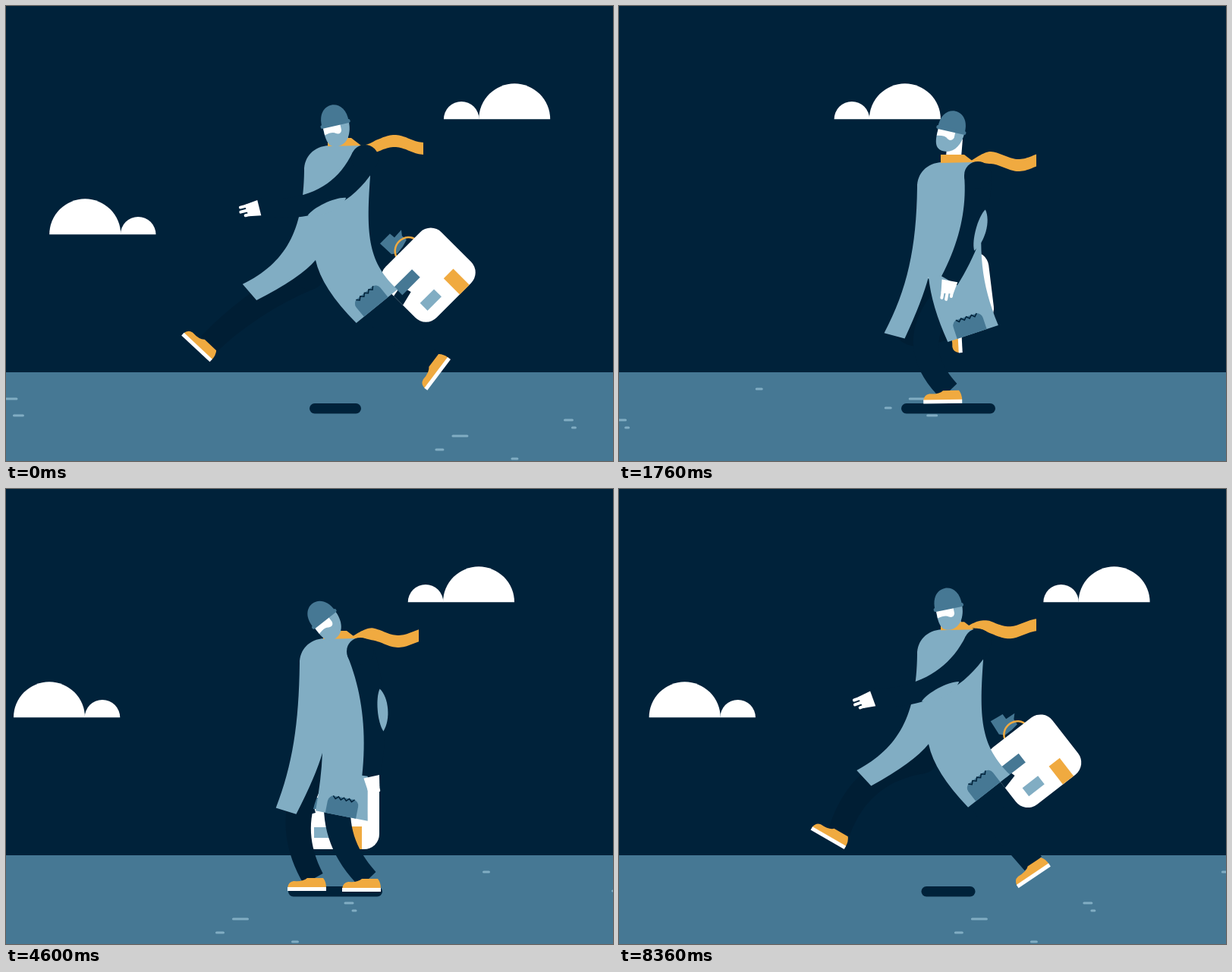
Animation of 800x600 px, one loop 8400 ms. Source, as an HTML page with a canvas:

```html
<!DOCTYPE html>
<html lang="en">
<head>
<meta charset="utf-8">
<title>Runner with a suitcase</title>
<style>
html, body { margin: 0; width: 100%; height: 100%; overflow: hidden; background: #00223a; }
canvas { display: block; }
</style>
</head>
<body>
<canvas id="stage" width="800" height="600"></canvas>
<script>
const ctx = document.getElementById('stage').getContext('2d');
const LOOP = 8400, STRIDE = 640, STOP = 3540, WRAP = 1134;
const DARK = '#00223a', SHADE = '#001e34', MID = '#467894', LIGHT = '#81adc3', ORANGE = '#f0aa40', WHITE = '#fff';
const { sin, cos, PI, hypot, atan2, min, max } = Math;

const mix = (a, b, u) => a + (b - a) * u;
const mixPose = (a, b, u) => Object.fromEntries(Object.keys(a).map(k => [k, mix(a[k], b[k], u)]));
const rad = deg => deg * PI / 180;
const wrap = x => ((x + 150) % WRAP + WRAP) % WRAP - 150;
const smooth = (a, b, t) => {
  const u = min(1, max(0, (t - a) / (b - a)));
  return u * u * (3 - 2 * u);
};
// Share of the way covered: quick start, long glide to a halt.
const travel = (t, start, a, b) => {
  const u = min(1, max(0, (t - start) / (STOP - start)));
  return 1 - (1 - u ** a) ** b;
};

// Angles in degrees: front and back are the swing of the coat flaps, upper and lower the arm.
const stance = {
  facing: 1, shadow: 124, reach: 0.6,
  farX: 410, farY: 514, farTilt: 0, nearX: 477, nearY: 515, nearTilt: 0
};
const alert = {
  ...stance, x: 428, y: 188, headX: -6, headY: -36, tilt: -10, hip: -16, front: 17, back: 30,
  upper: 76, lower: 113, hand: 105, bagX: 410, bagY: 415, bagTilt: 5
};
const tired = {
  ...stance, x: 434, y: 196, headX: -15, headY: -25, tilt: -38, hip: -17, front: 32, back: 17,
  upper: 70, lower: 98, hand: 78, bagX: 440, bagY: 428, bagTilt: 0, farX: 405
};
const proud = {
  ...stance, x: 441, y: 183, headX: -4, headY: -42, tilt: -28, hip: -12, front: 17, back: 25,
  upper: 50, lower: 157, hand: 176, bagX: 370, bagY: 407, bagTilt: 1.5, facing: -1
};

// Path of a running foot; phase 0 is the furthest point in front.
function foot(p) {
  const c = cos(p), s = sin(p);
  return {
    x: 415 - 148 * c + s * s * (20 + 65 * c),
    y: 462 + 42 * s - 4 * cos(2 * p) - 20 * sin(2 * p) - 12 * cos(3 * p),
    tilt: -26 + 48 * c + 42 * s + 21 * cos(2 * p) - 13 * sin(2 * p) - 4 * sin(3 * p)
  };
}

function runPose(t) {
  const p = t / STRIDE * 2 * PI, c = cos(p), s = sin(p), c2 = cos(2 * p);
  const drop = Math.abs(s) ** 3, far = foot(p), near = foot(p + PI);
  const lower = 127 + 52 * c + 7 * c2;
  return {
    x: 440, y: 183 + 22 * drop, headX: -6 + 4 * drop, headY: -28 - 14 * drop, tilt: -13 + 26 * drop,
    facing: 1, hip: -32, front: 64 - 34 * drop, back: 53 - 15 * drop, shadow: 68 + 56 * drop,
    upper: 68 + 70 * c - 20 * c2, lower, hand: lower - 20, reach: c,
    bagX: 443 + 110 * c + 4 * c2, bagY: 372 - 25 * c - 12 * s + 8 * c2, bagTilt: -21 - 24 * c - 14 * s,
    farX: far.x, farY: far.y, farTilt: far.tilt, nearX: near.x, nearY: near.y, nearTilt: near.tilt
  };
}

function poseAt(t, early) {
  const rest = mixPose(mixPose(alert, tired, smooth(3600, 4500, t)), proud, smooth(6000, 6850, t));
  const run = 1 - smooth(2400, 3300, t) + smooth(8040, 8340, t);
  return mixPose(rest, runPose(early), run);
}

function fill(color, draw) {
  ctx.fillStyle = color;
  ctx.beginPath();
  draw();
  ctx.fill();
}
const trace = p => {
  for (let i = 0; i < p.length; i += 2) ctx.lineTo(p[i], p[i + 1]);
};
const poly = (color, ...p) => fill(color, () => trace(p));
const pill = (color, x, y, w, h, r = h / 2) => fill(color, () => ctx.roundRect(x, y, w, h, r));
function line(color, width, ...p) {
  ctx.strokeStyle = color;
  ctx.lineWidth = width;
  ctx.beginPath();
  trace(p);
  ctx.stroke();
}
function at(x, y, angle, draw) {
  ctx.save();
  ctx.translate(x, y);
  ctx.rotate(angle);
  draw();
  ctx.restore();
}

// Tapered limb along a quadratic curve.
function limb(color, sx, sy, cx, cy, ex, ey, r0, r1) {
  const left = [], right = [];
  for (let n = 0; n <= 20; n++) {
    const u = n / 20, r = mix(r0, r1, u);
    const x = mix(mix(sx, cx, u), mix(cx, ex, u), u), y = mix(mix(sy, cy, u), mix(cy, ey, u), u);
    const dx = mix(cx - sx, ex - cx, u), dy = mix(cy - sy, ey - cy, u), len = hypot(dx, dy) || 1;
    left.push(x - dy / len * r, y + dx / len * r);
    right.unshift(x + dy / len * r, y - dx / len * r);
  }
  poly(color, ...left, ...right);
  fill(color, () => ctx.arc(sx, sy, r0, 0, 7));
}

function cloud(x, y, side) {
  for (const [dx, r] of [[0, 47], [70 * side, 23.3]]) fill(WHITE, () => ctx.arc(x + dx, y, r, PI, 0));
}

function drawScene(early) {
  const drift = WRAP * travel(early, -125, 1.22, 2.6);
  const slide = 6 * WRAP * travel(early, -100, 1.1, 2.245);
  const dash = (x, y, w) => pill(LIGHT, wrap(x + slide) - w / 2, y - 1.5, w, 3);
  ctx.fillStyle = DARK;
  ctx.fillRect(0, 0, 800, 600);
  ctx.fillStyle = MID;
  ctx.fillRect(0, 483, 800, 117);
  cloud(wrap(623 + drift), 149.3, -1);
  cloud(wrap(57 + drift), 301.3, 1);
  dash(633, 505, 10);
  dash(452, 546, 13);
  dash(459, 556, 7);
  dash(309, 567, 22);
  dash(282, 585, 12);
  dash(381, 597, 10);
  dash(845, 518, 30);
  dash(803, 530, 10);
  dash(861, 540, 15);
}

function drawBag(x, y, angle) {
  at(x, y, angle, () => {
    at(4, -55, angle, () =>
      poly(MID, 0, -28, -14, -13, -13, -5, -4, 2, 5, 7, 10, 1, 18, 0, 8, -9, 13, -15));
    ctx.strokeStyle = ORANGE;
    ctx.lineWidth = 2.5;
    ctx.beginPath();
    ctx.ellipse(4, -44, 17, 15, 0, PI, 0);
    ctx.stroke();
    pill(WHITE, -52, -48, 104, 95, 20);
    poly(DARK, -52, -13, -36, -16, -32, -1, -52, 4);
    ctx.fillStyle = MID;
    ctx.fillRect(-43, -21, 33, 15);
    ctx.fillStyle = LIGHT;
    ctx.fillRect(-34, 18, 26, 14);
    ctx.fillStyle = ORANGE;
    ctx.fillRect(11, 17, 18, 30);
  });
}

// The knee bends forward as the ankle nears the hip.
function drawLeg(color, hx, hy, x, y, tilt) {
  const dx = x - hx, dy = y - hy, len = hypot(dx, dy);
  const bend = 0.6 * Math.sqrt(max(0, 163 ** 2 - len ** 2)) / len;
  limb(color, hx, hy, (hx + x) / 2 - dy * bend, (hy + y) / 2 + dx * bend, x, y, 19, 14.5);
  at(x, y, rad(tilt), () => {
    fill(ORANGE, () => {
      ctx.moveTo(-34, 12);
      ctx.quadraticCurveTo(-33, 4, -26, 3);
      ctx.quadraticCurveTo(-13, 4, -8, -1);
      ctx.lineTo(13, -1);
      ctx.quadraticCurveTo(17, 4, 17, 12);
    });
    ctx.fillStyle = WHITE;
    ctx.fillRect(-34, 11, 51, 5);
  });
}

function drawScarf(x, y, crest) {
  const top = [], bottom = [];
  for (let q = 12; q <= 110; q += 2) {
    const mid = y - 5 * cos((q - crest) / 78 * 2 * PI), half = min(16, (q - 12) * 0.45) / 2;
    top.push(x + q, mid - half);
    bottom.unshift(x + q, mid + half);
  }
  poly(ORANGE, ...top, ...bottom);
}

function drawCoat({ x, y, hip, front, back }, sx, sy) {
  const lx = x - 47, ly = y + 34, rx = x + 40, ry = y + 42, waist = rx - 6 + (hip + 32) * 0.6;
  // Middle of a hem, then its two corners.
  const hem = (swing, side, length, tilt, half) => {
    const mx = sx + side * length * sin(rad(swing)), my = sy + length * cos(rad(swing));
    const dx = half * cos(rad(tilt)), dy = half * sin(rad(tilt));
    return [mx - dx, my - dy, mx + dx, my + dy];
  };
  const backTilt = 1.4 * (25 - back);
  const [ax, ay, bx, by] = hem(front, -1, 84 + 0.2 * front, front - 15, 14);
  const [cx, cy, dx, dy] = hem(back, 1, 80 + 0.4 * back, backTilt, 35);
  fill(LIGHT, () => {
    ctx.moveTo(x - 14, y + 1);
    ctx.bezierCurveTo(x - 35, y + 2, lx, ly - 18, lx, ly);
    ctx.bezierCurveTo(lx - 1, ly + 80, mix(ax, lx, 0.7), mix(ay, ly + 110, 0.7), ax, ay);
    ctx.lineTo(bx, by);
    ctx.quadraticCurveTo(mix(sx, bx, 0.25), mix(sy, by, 0.25) + 10, sx, sy);
    ctx.quadraticCurveTo(mix(sx, cx, 0.15), mix(sy, cy, 0.45), cx, cy);
    ctx.lineTo(dx, dy);
    ctx.bezierCurveTo(mix(waist, dx, 0.1), mix(ry + 110, dy, 0.1), waist, ry + 80, rx, ry);
    ctx.quadraticCurveTo(x + 38, y, x + 22, y);
  });
  at(cx, cy, rad(backTilt), () => {
    pill(MID, 13, -24, 41, 24, [8, 8, 0, 0]);
    const zig = [];
    for (let n = 0; n < 9; n++) zig.push(19 + n * 3.6, n % 2 ? -20.5 : -24);
    line(DARK, 1.5, ...zig);
  });
}

function drawHead(x, y, tilt, facing) {
  at(x, y, rad(tilt), () => {
    ctx.save();
    ctx.scale(facing, 1);
    fill(LIGHT, () => {
      ctx.moveTo(-17, 0);
      ctx.lineTo(18, 0);
      ctx.bezierCurveTo(18, 18, 9, 30, -3, 30);
      ctx.bezierCurveTo(-16, 30, -18, 20, -17, 0);
    });
    fill(WHITE, () => {
      ctx.moveTo(-17, 1);
      ctx.lineTo(6, 1);
      ctx.lineTo(6, 10);
      ctx.quadraticCurveTo(4, 16, -2, 13);
      ctx.quadraticCurveTo(-6, 9, -17, 12);
    });
    ctx.restore();
    fill(MID, () => {
      ctx.moveTo(-18, 1);
      ctx.bezierCurveTo(-19, -16, -10, -25, 0, -25);
      ctx.bezierCurveTo(10, -25, 19, -16, 18, 1);
    });
    pill(MID, -20, -2, 40, 5);
  });
}

function drawArm(sx, sy, { upper, lower, hand, reach }) {
  const up = 70 + 15 * reach, low = 80 + 20 * reach;
  const cx = sx + up * cos(rad(upper)), cy = sy + up * sin(rad(upper));
  const wx = cx + low * cos(rad(lower)), wy = cy + low * sin(rad(lower));
  const dx = wx - sx, dy = wy - sy, len = hypot(dx, dy);
  limb(DARK, sx, sy, cx, cy, wx, wy, 18, 12);
  const ex = cx / 2 + (sx + wx) / 4, ey = cy / 2 + (sy + wy) / 4;
  at(ex + dy / len * 13, ey - dx / len * 13, atan2(dy, dx), () => fill(LIGHT, () => {
    ctx.moveTo(-28, 2);
    ctx.bezierCurveTo(-16, -9, 14, -9, 28, 2);
    ctx.bezierCurveTo(16, 9, -16, 9, -28, 2);
  }));
  at(wx, wy, rad(hand), () => {
    poly(WHITE, 0, -11, 16, -8, 18, 8, 0, 10);
    ctx.lineCap = 'round';
    for (const [y, tip] of [[-6, 20], [0, 25], [6, 24]]) line(WHITE, 4, 12, y, tip, y);
    ctx.lineCap = 'butt';
  });
}

function drawMan(t, pose) {
  const { x, y, shadow, facing } = pose;
  const splitX = x + pose.hip, splitY = y + 152, headX = x + pose.headX, headY = y + pose.headY;
  pill(DARK, 434 - shadow / 2, 524, shadow, 13.5);
  drawBag(pose.bagX, pose.bagY, rad(pose.bagTilt));
  drawLeg(SHADE, splitX - 8, splitY + 20, pose.farX, pose.farY, pose.farTilt);
  drawLeg(DARK, splitX + 28, splitY + 25, pose.nearX, pose.nearY, pose.nearTilt);
  line(WHITE, 20, headX + 5 * facing, headY + 12, x + 1, y - 6);
  drawScarf(x, y, 72 + 0.1635 * t);
  drawCoat(pose, splitX, splitY);
  poly(ORANGE, x - 16, y - 9, x + 15, y - 9, x + 28, y + 1, x - 16, y + 2);
  drawHead(headX, headY, pose.tilt, facing);
  drawArm(x + 33, y + 18, pose);
}

const start = performance.now();
function frame() {
  const t = Math.floor((performance.now() - start) % LOOP / 40) * 40;
  const early = t > LOOP / 2 ? t - LOOP : t;
  // After the halt the scene waits at its starting place.
  drawScene(early);
  drawMan(t, poseAt(t, early));
  requestAnimationFrame(frame);
}
frame();
</script>
</body>
</html>
```
